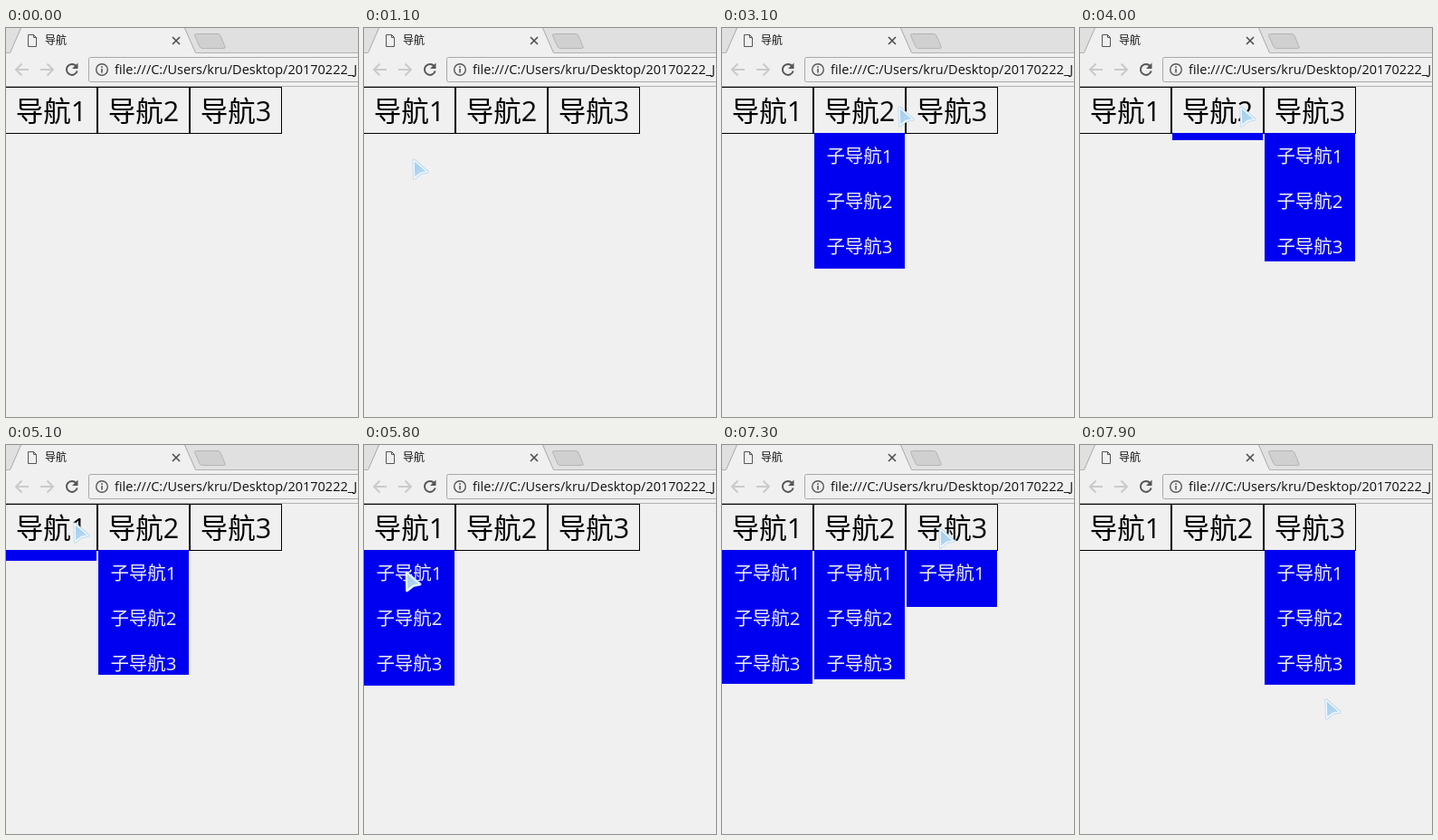
An HTML page that plays this animation: 389 px wide and 430 px high, repeating every 8 s.

```html
<!DOCTYPE html>
<html lang="zh-CN">
<head>
<meta charset="utf-8">
<title>导航</title>
<style>
  html, body { margin: 0; width: 100%; height: 100%; overflow: hidden; background: #f0f0f0; }
  svg { display: block; }
  text { font-family: "Open Sans", "Noto Sans CJK SC", "Noto Sans CJK", sans-serif; }
  .nav { font-size: 30.5px; text-anchor: middle; }
  .sub { font-size: 20.5px; font-weight: 500; text-anchor: middle; fill: #f0f0f0; }
</style>
</head>
<body>
<svg width="389" height="430" viewBox="0 0 389 430">
  <defs>
    <linearGradient id="ice" x1="0" y1="0" x2="1" y2="1">
      <stop offset="0" stop-color="#a4cdec"/>
      <stop offset="1" stop-color="#b9dbf4"/>
    </linearGradient>
  </defs>
  <rect width="389" height="430" fill="#f0f0f0"/>

  <!-- tab strip -->
  <rect width="389" height="28" fill="#e0e0e0"/>
  <path d="M0 27.5H389" stroke="#b2b2b2"/>
  <path d="M4 28L16.500 0H197.500L210 28Z" fill="#f0f0f0"/>
  <path d="M4.500 27.500L16.500 0M197.500 0L209.500 27.500" stroke="#a8a8a8" fill="none"/>
  <path d="M210.500 6.500H234Q236 6.500 237 8.500L242 20.500Q243 22.500 240.500 22.500H217Q215 22.500 214 20.500L208.500 8.500Q208 6.500 210.500 6.500Z" fill="#d0d0d0" stroke="#b4b4b4"/>
  <path d="M24.500 7.500H30.500L33.500 10.500V20.500H24.500ZM30.500 7.500V10.500H33.500" fill="#f0f0f0" stroke="#555"/>
  <text x="43" y="18" font-size="12" fill="#111">导航</text>
  <path d="M184 10L192 18M192 10L184 18" stroke="#4c4c4c" stroke-width="1.600"/>

  <!-- toolbar -->
  <rect y="28" width="389" height="37" fill="#f0f0f0"/>
  <path d="M0 64.500H389" stroke="#b2b2b2"/>
  <g fill="none" stroke="#cacaca" stroke-width="2">
    <path d="M25 46H11M17.500 39.500L11 46L17.500 52.500"/>
    <path d="M38 46H52M45.500 39.500L52 46L45.500 52.500"/>
    <path d="M77.500 42A6 6 0 1 0 78.700 47.500" stroke="#565656"/>
  </g>
  <path d="M79.500 38.500V45H73Z" fill="#565656"/>
  <rect x="91.500" y="32.500" width="310" height="27" rx="2" fill="#f0f0f0" stroke="#a8a8a8"/>
  <circle cx="106" cy="46" r="6.300" fill="none" stroke="#565656" stroke-width="1.400"/>
  <path d="M106 45V49.500M106 42.300V43.900" stroke="#565656" stroke-width="1.600"/>
  <text x="120" y="51" font-size="14.500" fill="#111">file:///C:/Users/kru/Desktop/20170222_J</text>

  <g id="page"></g>
  <g id="cursor" stroke-linejoin="round">
    <path d="M1 1L16 14L8.500 15.500L1.500 21Z" fill="none" stroke="#b4d2e8" stroke-width="3"/>
    <path d="M1 1L16 14L8.500 15.500L1.500 21Z" fill="url(#ice)" stroke="#f0f8fe" stroke-width="1.600"/>
  </g>
</svg>
<script>
const LOOP = 8000, STEP = 100, SLIDE = 500;
const TOP = 116, ROW = 50, HEIGHT = 3 * ROW, PITCH = 102;

// Pointer moves: start, end, x, y; it rests in between
const home = [58, 326];
const moves = [
  [400, 1300, 53, 93],
  [1800, 2200, 165, 87],
  [3000, 3280, 250, 88],
  [3790, 4100, 142, 86],
  [4855, 5200, 48, 86],
  [5700, 6150, 40, 328],
  [6460, 6600, 39, 256],
  [6600, 6870, 102, 95],
  [6870, 7150, 240, 92],
  [7500, 7900, 271, 281]
];

const page = document.getElementById("page");
const cursor = document.getElementById("cursor");
const clamp = p => Math.min(1, Math.max(0, p));
const swing = p => 0.5 - Math.cos(Math.PI * clamp(p)) / 2;

function pointAt(t) {
  return moves.reduce(([x, y], [from, to, x1, y1]) => {
    const k = clamp((t - from) / (to - from));
    return [x + (x1 - x) * k, y + (y1 - y) * k];
  }, home);
}

// Follow the pointer once to learn when it enters and leaves each item
function findVisits() {
  const visits = [[], [], []];
  let item = -1;
  for (let t = 0; t < LOOP; t += 5) {
    const [x, y] = pointAt(t);
    const column = Math.floor((x + 1) / PITCH);
    const inMenu = column === item && y < TOP + HEIGHT;
    const next = y < TOP || inMenu ? column : -1;
    if (next === item) continue;
    if (item >= 0) visits[item].at(-1).leave = t;
    if (next >= 0) visits[next].push({ enter: t, leave: LOOP });
    item = next;
  }
  return visits;
}

// A closing slide waits until the opening one is done
function openness(visits, t) {
  return visits.reduce((sum, { enter, leave }) => {
    const close = Math.max(leave, enter + SLIDE);
    return sum + swing((t - enter) / SLIDE) - swing((t - close) / SLIDE);
  }, 0);
}

function add(parent, tag, attrs, text = "") {
  const el = document.createElementNS("http://www.w3.org/2000/svg", tag);
  for (const key in attrs) el.setAttribute(key, attrs[key]);
  el.textContent = text;
  return parent.appendChild(el);
}

function buildMenu(visits, i) {
  const x = i * PITCH, mid = x + 50;
  add(page, "rect", { x: x - 0.5, y: 65.5, width: 101, height: 51, fill: "none", stroke: "#000" });
  add(page, "text", { class: "nav", x: mid, y: 103 }, "导航" + (i + 1));
  const clip = add(page, "clipPath", { id: "clip" + i });
  const mask = add(clip, "rect", { x, y: TOP, width: 100, height: 0 });
  const menu = add(page, "g", { "clip-path": `url(#clip${i})` });
  add(menu, "rect", { x, y: TOP, width: 100, height: HEIGHT, fill: "#0000f0" });
  for (let n = 0; n < 3; n++)
    add(menu, "text", { class: "sub", x: mid, y: 149 + n * ROW }, "子导航" + (n + 1));
  return { visits, mask };
}

const menus = findVisits().map(buildMenu);

function draw(now) {
  const t = Math.floor((now % LOOP) / STEP) * STEP;
  for (const { visits, mask } of menus)
    mask.setAttribute("height", Math.round(HEIGHT * openness(visits, t)));
  const [x, y] = pointAt(t).map(Math.round);
  cursor.setAttribute("transform", `translate(${x} ${y})`);
  cursor.setAttribute("visibility", t < STEP ? "hidden" : "visible");
}

let start;
function tick(now) {
  start ??= now;
  draw(now - start);
  requestAnimationFrame(tick);
}
draw(0);
requestAnimationFrame(tick);
</script>
</body>
</html>
```
